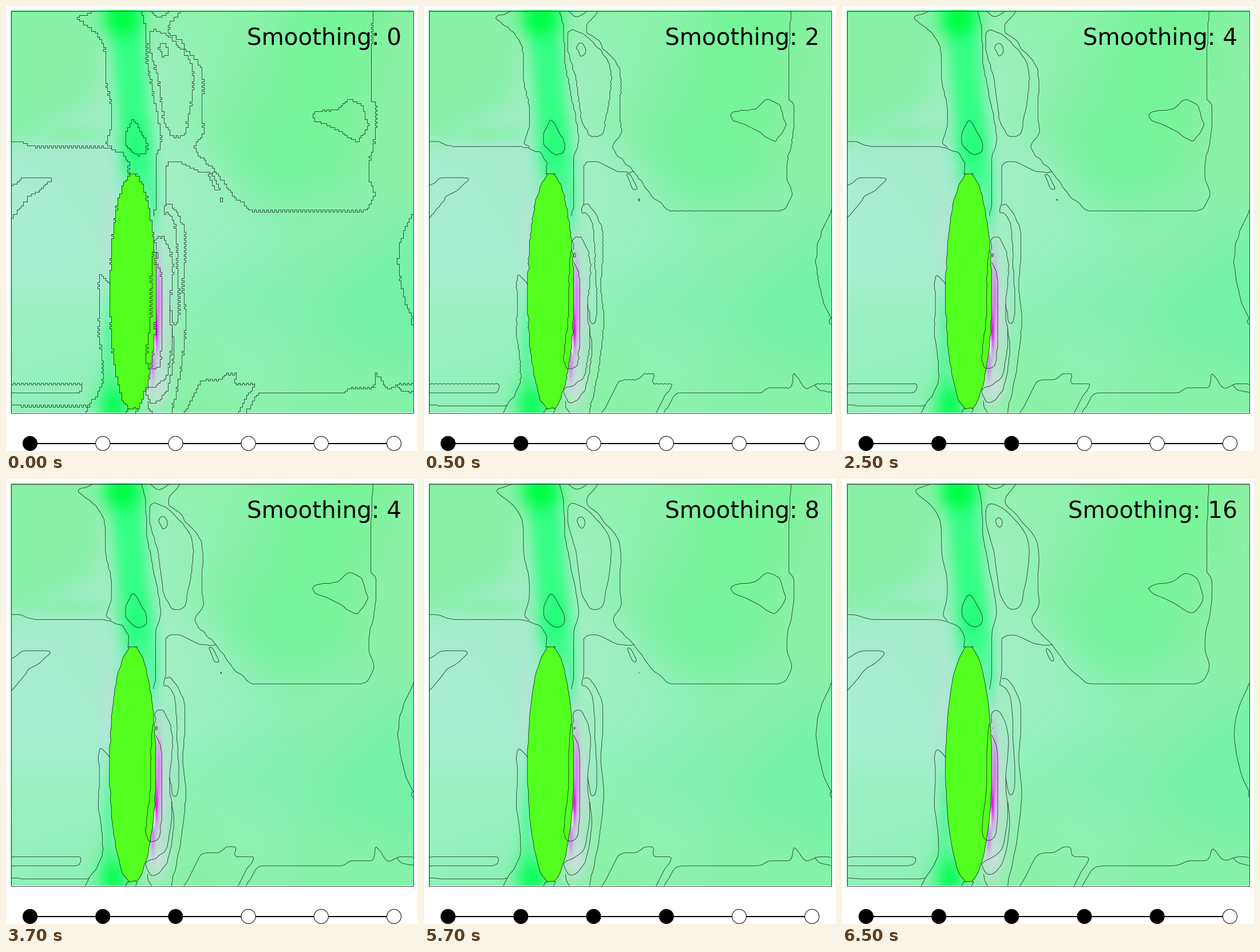
A matplotlib script for the animation above (8000 ms loop, 720 px wide and 778 px high).

```python
import numpy as np
import matplotlib.pyplot as plt
from matplotlib.animation import FuncAnimation
from matplotlib.collections import LineCollection
from matplotlib.patches import Circle, Polygon, Rectangle

W, H, DPI = 720, 778, 100
PT = 72 / DPI                       # one pixel in points
EDGE, FAR = 8.5, 711.5              # sides of the map
CELL = (FAR - EDGE) / 200
LEVELS = [0, 2, 4, 8, 16]
STARTS = [1, 5, 9, 13]              # ticks of 500 ms at which the level rises

# Soft base colours: x, y, r, g, b
BASE = [
    (30, 80, 136, 241, 167), (60, 400, 168, 238, 210), (150, 330, 165, 235, 205),
    (60, 600, 155, 240, 195), (90, 700, 142, 241, 180), (300, 110, 163, 238, 192),
    (330, 30, 140, 243, 170), (300, 330, 162, 239, 195), (400, 150, 130, 243, 165),
    (550, 160, 118, 245, 153), (470, 260, 118, 245, 158), (690, 200, 142, 240, 167),
    (380, 400, 152, 240, 190), (560, 420, 140, 241, 175), (450, 520, 130, 243, 178),
    (640, 520, 115, 243, 168), (400, 620, 145, 241, 180), (580, 660, 134, 243, 170),
    (330, 690, 135, 243, 165),
]

# Local spots: x, y, width, height, r, g, b, strength
SPOTS = [
    (203, 25, 24, 22, 0, 255, 70, 1), (226, 240, 16, 25, 20, 255, 110, .6),
    (120, 225, 60, 12, 120, 246, 150, .5), (258, 350, 8, 35, 60, 250, 150, .6),
    (180, 600, 9, 70, 60, 250, 140, .6), (189, 698, 20, 30, 5, 255, 85, .9),
    (177, 410, 8, 60, 195, 222, 222, .4), (262, 550, 19, 75, 213, 213, 230, .9),
    (264, 665, 14, 24, 208, 224, 224, .8), (267, 515, 3.5, 45, 225, 115, 245, .9),
    (263, 568, 2.2, 22, 225, 0, 240, .9), (257, 625, 3, 20, 215, 110, 240, .8),
    (259, 593, 1.8, 11, 255, 250, 255, .9),
]

paths = []                          # (grid path, closed)


def trace(points):
    """Follow a polyline along the edges of the cell grid."""
    nodes = (np.array(points, float) - EDGE) / CELL
    path = [tuple(np.round(nodes[0]))]

    def visit(node):
        if len(path) > 1 and path[-2] == node:
            path.pop()
        elif path[-1] != node:
            path.append(node)

    for k, (a, b) in enumerate(zip(nodes, nodes[1:]), 2):
        step = b - a
        major = int(np.argmax(np.abs(step)))
        count = max(1, round(abs(step[major])))
        for i in range(1, count + 1):
            q = a + step * i / count
            if i < count or k < len(nodes):     # a line between rows gets teeth
                q[1 - major] += 0.2 * (-1) ** round(q[major])
            q = tuple(np.round(q))
            corner = list(path[-1])
            corner[major] = q[major]
            visit(tuple(corner))
            visit(q)
    return np.array(path) * CELL + EDGE


def spline(points, closed):
    """Centripetal Catmull-Rom curve through the points."""
    p = np.array(points, float)
    if closed:
        p = np.vstack([p[-1:], p, p[:2]])
    else:
        p = np.vstack([2 * p[0] - p[1], p, 2 * p[-1] - p[-2]])
    h = np.sqrt(np.hypot(*np.diff(p, axis=0).T))[:, None]
    d = np.diff(p, axis=0) / h
    m = d[:-1] - (p[2:] - p[:-2]) / (h[:-1] + h[1:]) + d[1:]
    u = np.linspace(0, 1, 9)[:-1, None]
    parts = []
    for i in range(1, len(p) - 2):
        parts.append((2 * u**3 - 3 * u**2 + 1) * p[i] + (3 * u**2 - 2 * u**3) * p[i + 1]
                     + h[i] * ((u**3 - 2 * u**2 + u) * m[i - 1] + (u**3 - u**2) * m[i]))
    return np.vstack(parts + [p[-2:-1]])


def straight(*points):
    paths.append((trace(points), False))


def curve(*points, closed=False):
    paths.append((trace(spline(points, closed)), closed))


def ring(x, y, rx, ry):
    a = np.linspace(0, 2 * np.pi, 17)
    paths.append((trace(np.column_stack([x + rx * np.cos(a), y + ry * np.sin(a)])), True))


def ellipse_side(sign):
    y = np.linspace(294, 703, 50)
    x = 221.3 + sign * 40.3 * np.sqrt(1 - ((y - 498.5) / 207.5) ** 2)
    paths.append((trace(np.column_stack([x, y])), False))


def smooth(path, rounds, closed):
    p = path[:-1].copy() if closed else path.copy()
    for _ in range(rounds):
        q = (np.roll(p, 1, 0) + 2 * p + np.roll(p, -1, 0)) / 4
        if not closed:
            q[[0, -1]] = p[[0, -1]]
        p = q
    return np.vstack([p, p[:1]]) if closed else p


def terrain(size=704):
    axis = EDGE + (np.arange(size) + 0.5) * (FAR - EDGE) / size
    x, y = np.meshgrid(axis, axis)
    total = np.zeros((size, size, 1))
    image = np.zeros((size, size, 3))
    for cx, cy, *rgb in BASE:
        w = np.exp(-((x - cx) ** 2 + (y - cy) ** 2) / (2 * 60 ** 2))[..., None]
        total += w
        image += w * np.array(rgb)
    image /= total

    def blend(rgb, alpha):
        image[:] += (np.array(rgb) - image) * alpha[..., None]

    band = np.exp(-np.abs((x - 207 - 0.09 * (y - 8)) / 31) ** 2.8)
    blend((48, 255, 133), 0.95 * band / (1 + np.exp((y - 330) / 15)))
    for cx, cy, sx, sy, r, g, b, strength in SPOTS:
        spot = np.exp(-((x - cx) / sx) ** 2 / 2 - ((y - cy) / sy) ** 2 / 2)
        blend((r, g, b), strength * spot)
    return np.clip(image / 255, 0, 1)


# the ellipse and its tips
ellipse_side(-1)
ellipse_side(1)
straight((214, 294), (229, 294))
straight((214, 703), (229, 703))
straight((214, 703), (208, 712))
straight((229, 703), (225, 712))

# banks of the green band
curve((155, 8), (129, 18), (123, 21), (131, 28), (169, 63), (174, 130), (184, 175),
      (184, 212), (175, 240), (184, 248))
straight((8, 238), (22, 238), (48, 246), (170, 246), (207, 258), (215, 272), (214, 294))
curve((236, 8), (243, 28), (247, 102), (257, 152), (270, 238), (262, 263), (261, 345),
      (257, 366))
curve((222, 198), (233, 213), (246, 242), (238, 259), (218, 252), (208, 236), (214, 215),
      closed=True)

# north-east
curve((252, 8), (267, 19), (286, 8))
curve((305, 8), (284, 37), (316, 74), (341, 107), (342, 195), (345, 218), (330, 248),
      (368, 291))
curve((368, 291), (402, 335), (427, 358.2))
straight((427, 358.2), (625, 358.2))
curve((625, 358.2), (643, 336), (633, 290), (645, 225), (645, 172), (638, 164))
straight((638, 164), (638, 90), (641, 8))
curve((262, 42), (297, 67), (325, 103), (318, 195), (306, 228), (282, 217), (266, 130),
      (252, 80), (252, 47), closed=True)
ring(275, 75.5, 7.5, 12.5)
straight((536, 190), (541, 184), (583, 181), (598, 163), (622, 173), (633, 207),
         (615, 238), (580, 217), (538, 198), (536, 190))
curve((354, 294), (362, 297), (374, 322), (365, 318), closed=True)
ring(375.3, 340, 2.4, 4)

# nested lines east of the ellipse
curve((368, 291), (340, 289), (312, 274), (283, 273), (280, 280))
straight((280, 280), (280, 338), (275, 360))
curve((275, 360), (291, 370), (299, 455), (301, 540), (293, 558), (286, 520))
curve((278, 348), (285, 345), (308, 376), (313, 430), (309, 490), (314, 550), (304, 640),
      (288, 712))
curve((262, 427), (261, 408), (272, 404), (290, 440), (286, 530), (290, 575), (275, 652),
      (243, 672))
curve((290, 565), (293, 605), (281, 668), (258, 694), (243, 679), (244, 672))
curve((263, 447), (270, 465), (272, 545), (264, 632), (248, 632), (253, 530), (254, 460),
      (258, 426))
ring(262.8, 435, 2.2, 5)
straight((249, 690), (247, 698), (256, 712))

# west and south-west
curve((181, 487), (164, 471), (164, 530), (161, 560), (168, 655), (145, 698.5))
straight((145, 698.5), (28, 698.5), (22, 697), (8, 697))
straight((146, 698), (138, 712))
straight((8, 661.2), (133, 661.2), (131, 667), (123, 675.4), (8, 675.4))
straight((8, 316), (26, 300), (78, 300), (81, 304), (62, 322), (35, 338), (8, 371))

# south and east
straight((312, 712), (342, 654), (371, 654), (386, 643), (402, 643), (398, 660),
         (433, 661), (404, 712))
straight((420, 712), (442, 675.4), (588, 675.4), (600, 667), (643, 668), (646, 642),
         (670, 668), (688, 661.2), (712, 661.2))
straight((685, 662), (692, 673), (712, 675.4))
curve((712, 356), (689, 412), (686, 453), (700, 520), (712, 545))
straight((712, 546), (708, 549), (708, 556), (712, 557))

stages = []
for n in LEVELS:
    lines = [smooth(p, n, closed) for p, closed in paths]
    stages.append((np.vstack([lines[0], lines[1][::-1]]), lines))

fig = plt.figure(figsize=(W / 100, H / 100), dpi=DPI, facecolor="white")
ax = fig.add_axes([0, 0, 1, 1])
ax.imshow(terrain(), extent=(8, 712, 711.5, 8), aspect="auto")
ax.set(xlim=(0, W), ylim=(H, 0))
ax.axis("off")

lens = ax.add_patch(Polygon(stages[0][0], fc=(82 / 255, 1, 30 / 255), ec="none", zorder=2))
contours = ax.add_collection(LineCollection([], colors=[(0, 0, 0, 0.72)],
                                            linewidths=0.9 * PT, zorder=3))
border = ax.add_patch(Rectangle((EDGE, EDGE), FAR - EDGE, FAR - EDGE, fill=False,
                                ec=(0, 0, 0, 0.75), lw=PT, zorder=4))
contours.set_clip_path(border)
label = ax.text(691, 68, "", ha="right", va="baseline", family="DejaVu Sans",
                size=40.4 * PT, color="black", zorder=5)

ax.plot([42, 678], [764.8, 764.8], color="black", lw=2 * PT, zorder=4)
dots = [ax.add_patch(Circle((42 + 127.2 * i, 764.8), 12.5, ec="black", lw=PT, zorder=5))
        for i in range(6)]


def draw(tick):
    stage = sum(tick >= s for s in STARTS)
    outline, lines = stages[stage]
    lens.set_xy(outline)
    contours.set_segments(lines)
    label.set_text(f"Smoothing: {LEVELS[stage]}")
    for i, dot in enumerate(dots):
        dot.set_facecolor("black" if i <= stage else "white")
    return [lens, contours, label, *dots]


animation = FuncAnimation(fig, draw, frames=16, interval=500, repeat=True, repeat_delay=0)
plt.show()
```
